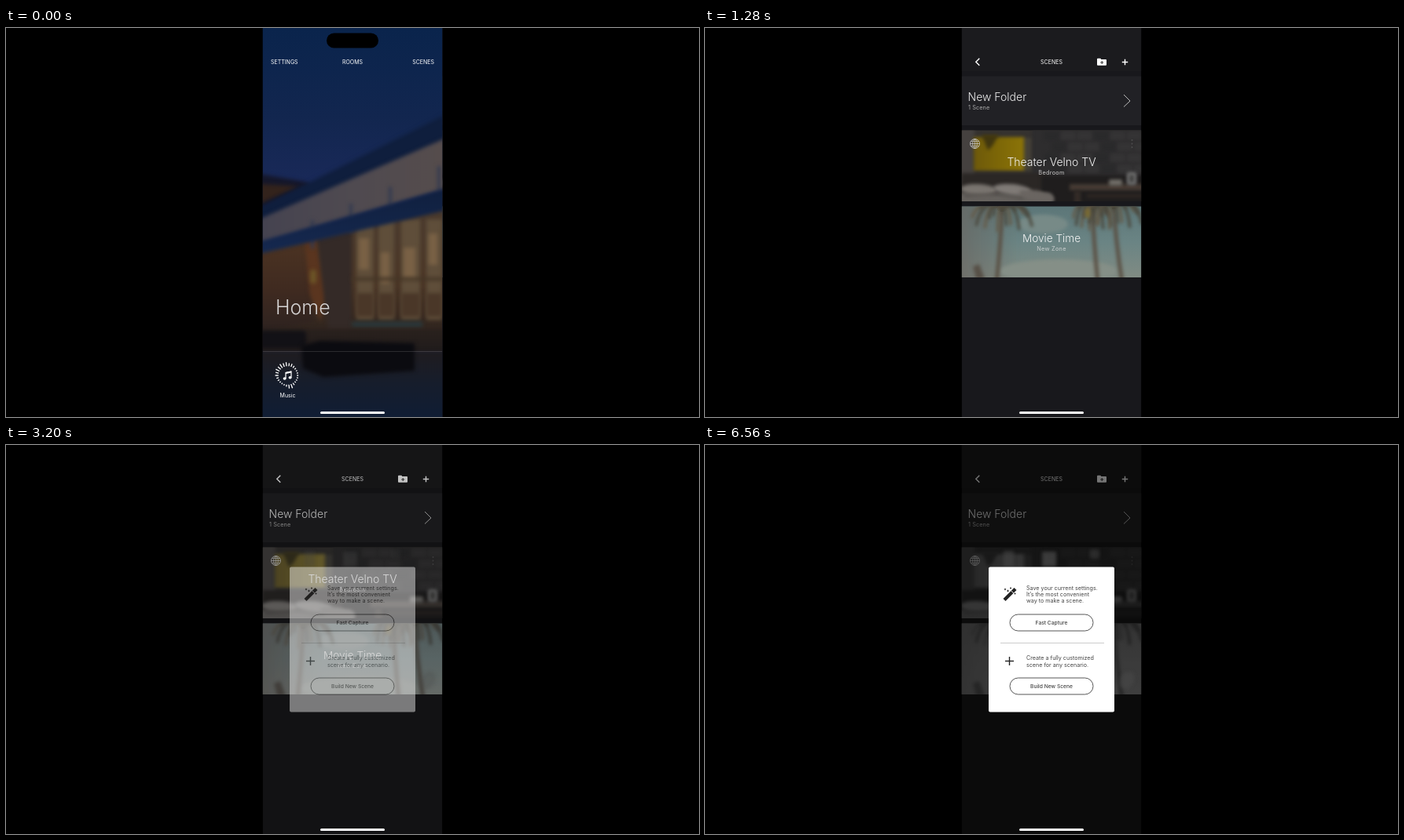
An HTML page with a canvas for the animation above (6.64 s loop, 882 by 496 pixels).

```html
<!DOCTYPE html>
<html lang="en">
<head>
<meta charset="utf-8">
<title>Scenes</title>
<style>
html, body { margin: 0; width: 100%; height: 100%; overflow: hidden; background: #000; }
canvas { display: block; }
</style>
</head>
<body>
<canvas id="stage" width="882" height="496"></canvas>
<script>
const LOOP = 6640, STEP = 80, X = 326.5, W = 229, H = 496;
const ctx = document.getElementById('stage').getContext('2d');

function layer(draw) {
  const c = document.createElement('canvas');
  c.width = 882;
  c.height = H;
  draw(c.getContext('2d'));
  return c;
}

function clipRect(g, x, y, w, h) {
  g.beginPath();
  g.rect(x, y, w, h);
  g.clip();
}

function rect(g, color, x, y, w, h, r = 0) {
  g.fillStyle = color;
  g.beginPath();
  g.roundRect(x, y, w, h, r);
  g.fill();
}

function poly(g, color, ...p) {
  g.fillStyle = color;
  g.beginPath();
  for (let i = 0; i < p.length; i += 2) g.lineTo(p[i], p[i + 1]);
  g.fill();
}

function line(g, color, width, ...p) {
  g.strokeStyle = color;
  g.lineWidth = width;
  g.beginPath();
  for (let i = 0; i < p.length; i += 2) g.lineTo(p[i], p[i + 1]);
  g.stroke();
}

function curve(g, color, width, x0, y0, cx, cy, x1, y1) {
  g.strokeStyle = color;
  g.lineWidth = width;
  g.beginPath();
  g.moveTo(x0, y0);
  g.quadraticCurveTo(cx, cy, x1, y1);
  g.stroke();
}

function oval(g, color, x, y, rx, ry = rx, turn = 0) {
  g.fillStyle = color;
  g.beginPath();
  g.ellipse(x, y, rx, ry, turn, 0, 7);
  g.fill();
}

function text(g, str, x, y, size, color = '#fff', align = 'left', weight = 400, gap = 0) {
  g.font = `${weight} ${size}px Inter, "Open Sans", sans-serif`;
  g.letterSpacing = gap + 'px';
  g.textAlign = align;
  g.fillStyle = color;
  g.fillText(str, x, y);
}

function plus(g, color, x, y, r, width) {
  line(g, color, width, x - r, y, x + r, y);
  line(g, color, width, x, y - r, x, y + r);
}

function gradient(g, x0, y0, x1, y1, ...colors) {
  const fill = g.createLinearGradient(x0, y0, x1, y1);
  colors.forEach((c, i) => fill.addColorStop(i / (colors.length - 1), c));
  return fill;
}

const down = (g, y0, y1, ...colors) => gradient(g, 0, y0, 0, y1, ...colors);

function house(g) {
  rect(g, down(g, 0, 230, '#0a244c', '#12264f', '#1c2a5c'), 310, -10, 270, 520);
  g.filter = 'blur(2.5px)';
  poly(g, '#15172a', 310, 184, 380, 196, 390, 201, 310, 238);
  poly(g, '#33231c', 310, 198, 372, 202, 310, 230);
  // Glass front
  poly(g, down(g, 250, 400, '#4a3a2d', '#4a3626', '#2a211d'), 310, 280, 570, 225, 570, 412, 310, 412);
  poly(g, down(g, 280, 390, '#4a3222', '#3f2a20', '#2c2220'), 310, 290, 384, 272, 392, 375, 310, 390);
  poly(g, '#5a351f', 380, 272, 396, 268, 407, 340, 400, 374, 387, 340);
  poly(g, '#342a27', 396, 268, 440, 258, 440, 385, 410, 385);
  rect(g, '#6b5426', 387, 308, 8, 18, 4);
  for (const [x, w] of [[446, 22], [474, 20], [503, 24], [535, 20]]) {
    rect(g, '#5f4e3a', x, 244, w, 128);
    rect(g, '#796145', x + 3, 262 + x % 5 * 6, w - 9, 40);
    rect(g, '#4a3728', x, 338, w, 30);
  }
  rect(g, '#443526', 440, 318, 116, 4);
  rect(g, '#2b3638', 440, 374, 90, 8);
  // Roof, fascia and lower beam
  poly(g, '#0f1e3d', 310, 235, 570, 105, 570, 140, 310, 255);
  poly(g, gradient(g, 326, 0, 556, 0, '#454350', '#4f4a50', '#554c4c'), 310, 249, 570, 136, 570, 202, 310, 279);
  for (const x of [388, 437, 487, 549])
    rect(g, '#323a50', x, 400 - x * .43 + 12, 4, 36);
  poly(g, down(g, 208, 285, '#10203f', '#15284f'), 310, 276, 570, 202, 570, 230, 310, 291);
  // Terrace
  rect(g, down(g, 384, 414, '#2a211d', '#1f1b1b'), 310, 384, 260, 30);
  rect(g, down(g, 412, 496, '#1f1c1f', '#161d2c', '#101d34'), 310, 412, 260, 100);
  rect(g, '#121116', 318, 386, 64, 22, 5);
  poly(g, '#0b0b10', 376, 405, 400, 399, 520, 402, 520, 437, 404, 445, 378, 434);
  g.filter = 'none';
}

const home = layer(g => {
  g.save();
  clipRect(g, X, 0, W, H);
  house(g);
  rect(g, '#000', 408, 6.5, 66, 19, 9.5);
  text(g, 'SETTINGS', 337, 45.7, 7);
  text(g, 'ROOMS', 441, 45.7, 7, '#fff', 'center');
  text(g, 'SCENES', 545, 45.7, 7, '#fff', 'right');
  text(g, 'Home', 343, 365, 25, '#d5d3d3', 'left', 300);
  rect(g, 'rgba(255,255,255,.13)', X, 412, W, 1);
  for (let i = 0; i < 26; i++) {
    const a = i * Math.PI / 13, c = Math.cos(a), s = Math.sin(a);
    const len = 1.8 + 3 * Math.max(0, Math.cos(a + 2.2)) * (1 + i % 2 * .3) + 4 * Math.max(0, Math.cos(a - 1.3)) ** 20;
    line(g, '#fff', 1.3, 358.5 + 11.8 * c, 443 + 11.8 * s, 358.5 + (11.8 + len) * c, 443 + (11.8 + len) * s);
  }
  line(g, '#fff', 1.2, 356, 447, 356, 439.5, 363, 438, 363, 445.5);
  line(g, '#fff', 1.8, 356, 440, 363, 438.5);
  oval(g, '#fff', 354.6, 447, 2, 1.7);
  oval(g, '#fff', 361.6, 445.7, 2, 1.7);
  text(g, 'Music', 358.5, 470.8, 7, '#fff', 'center');
  g.restore();
});

function bedroom(g) {
  g.save();
  clipRect(g, X, 130.5, W, 90.5);
  rect(g, '#35322f', 310, 120, 260, 110);
  g.filter = 'blur(2px)';
  rect(g, '#45413f', 320, 125, 23, 76);
  rect(g, '#2e2d2e', 416, 125, 150, 78);
  for (let i = 0; i < 24; i++)
    rect(g, i % 3 ? '#353435' : '#2a2a2b', 432 + i % 6 * 21 + (i / 6 & 1) * 9, 132 + (i / 6 | 0) * 14, 19, 11);
  rect(g, '#454138', 404, 140, 11, 42);
  rect(g, gradient(g, 342, 0, 406, 0, '#6d590b', '#7d6707', '#8c7408'), 342, 139, 64, 43);
  poly(g, '#40360f', 352, 136, 374, 136, 366, 150, 360, 156);
  rect(g, '#2b2725', 326, 185, 110, 20);
  rect(g, '#1f1d1d', 428, 188, 140, 40);
  rect(g, '#463b34', 464, 199, 100, 8);
  rect(g, '#342c27', 470, 208, 8, 16);
  rect(g, '#302824', 486, 212, 76, 4);
  rect(g, '#66625e', 318, 210, 125, 20, 6);
  oval(g, '#79746f', 348, 206, 23, 7, .05);
  oval(g, '#7f7a76', 391, 206, 24, 7, .1);
  oval(g, '#6a6561', 422, 214, 23, 6, .2);
  line(g, '#4a4643', 2, 330, 214, 372, 212, 405, 217);
  rect(g, '#6f6c66', 514, 193, 17, 8, 2);
  rect(g, '#767676', 537, 184, 12, 16, 2);
  rect(g, '#40403f', 540, 187, 6, 10);
  g.restore();
}

// Ragged crown on a slim, bent trunk
function palm(g, x, y, foot, spread) {
  g.lineCap = 'round';
  curve(g, '#5a5145', 5, x, y, x + (foot - x) * .2, y + 45, foot, 325);
  for (let i = 0; i < 15; i++) {
    const d = (i - 7) / 7 * spread;
    const drop = 20 + 13 * Math.sin(i * 2.4) - Math.abs(d) * .15;
    curve(g, i % 3 ? '#4a483d' : '#645a48', 3.5, x, y, x + d * .8, y - 9, x + d, y + drop);
  }
}

function beach(g) {
  g.save();
  clipRect(g, X, 227.5, W, 90.5);
  rect(g, down(g, 227, 318, '#5c7678', '#6a8484', '#808b83'), 310, 220, 260, 110);
  g.filter = 'blur(2px)';
  rect(g, gradient(g, 326, 0, 400, 0, 'rgba(105,103,99,.75)', 'rgba(105,103,99,0)'), 310, 220, 90, 110);
  oval(g, '#858f87', 450, 310, 75, 15);
  oval(g, '#778a87', 430, 250, 32, 12);
  palm(g, 378, 227, 371, 38);
  palm(g, 493, 225, 500, 24);
  palm(g, 520, 224, 531, 36);
  poly(g, '#575047', 345, 320, 341, 304, 349, 301, 356, 320);
  oval(g, '#7c6c30', 487, 236, 3, 7);
  g.restore();
}

const scenes = layer(g => {
  g.save();
  clipRect(g, X, 0, W, H);
  rect(g, '#18181c', X, 0, W, H);
  rect(g, '#1b1b1e', X, 0, W, 55);
  rect(g, '#212125', X, 61.5, W, 62.5);
  bedroom(g);
  beach(g);
  line(g, '#fff', 1.4, 349.3, 38.7, 344.8, 43.2, 349.3, 47.7);
  text(g, 'SCENES', 441, 45.7, 7, '#fff', 'center');
  rect(g, '#fff', 499, 38.8, 5, 3, 1);
  rect(g, '#fff', 499, 40, 12, 7.8, 1);
  plus(g, '#333', 505.2, 44, 2, 1);
  plus(g, '#fff', 534.5, 43.5, 3.7, 1.4);
  text(g, 'New Folder', 334.5, 93, 14, '#eee', 'left', 300);
  text(g, '1 Scene', 335, 104.3, 7.3, '#aaa', 'left', 400, .1);
  line(g, '#bbb', 1, 533, 85, 541, 93, 533, 100.5);
  g.strokeStyle = '#ccc';
  g.lineWidth = .8;
  for (const r of [6, 2.8]) {
    g.beginPath();
    g.ellipse(343.5, 147.5, r, 6, 0, 0, 7);
    g.stroke();
  }
  plus(g, '#ccc', 343.5, 147.5, 6, .7);
  for (const d of [-3, 3]) line(g, '#ccc', .6, 338.3, 147.5 + d, 348.7, 147.5 + d);
  for (const y of [143, 147.5, 152]) oval(g, 'rgba(255,255,255,.15)', 543.5, y, .9);
  text(g, 'Theater Velno TV', 441, 176, 14, '#f4f4f4', 'center', 300);
  text(g, 'Bedroom', 441, 187, 7.3, '#c4c4c4', 'center', 400, .3);
  text(g, 'Movie Time', 441, 273, 13.6, '#f4f4f4', 'center', 300);
  text(g, 'New Zone', 441, 284, 7.3, '#c9cece', 'center', 400, .3);
  g.restore();
});

function button(g, label, y) {
  g.strokeStyle = '#444';
  g.lineWidth = .9;
  g.beginPath();
  g.roundRect(388, y, 106, 21, 10.5);
  g.stroke();
  text(g, label, 441, y + 12.9, 6.7, '#444', 'center', 500);
}

const dialog = layer(g => {
  const note = (lines, y) => lines.forEach((s, i) => text(g, s, 409, y + i * 8.2, 7.15, '#444'));
  rect(g, '#fff', 361, 155.5, 160, 185, 2);
  line(g, '#222', 4.2, 381, 197.5, 395, 183.5);
  line(g, '#fff', 1, 389.5, 185.8, 392.8, 189);
  for (const [x, y, r] of [[382, 184, 1.2], [385.5, 186, 1.3], [389, 182.5, 1], [394.5, 189.5, 1]])
    plus(g, '#222', x, y, r, .9);
  note(['Save your current settings.', 'It\u2019s the most convenient', 'way to make a scene.'], 185);
  button(g, 'Fast Capture', 216);
  line(g, '#ccc', 1, 376, 252.5, 508, 252.5);
  plus(g, '#222', 387.5, 275.5, 5.5, 1.4);
  note(['Create a fully customized', 'scene for any scenario.'], 274.3);
  button(g, 'Build New Scene', 297);
});

// Pale patches that show up in the dimmed pictures
const glow = layer(g => {
  g.filter = 'blur(2px)';
  rect(g, '#555', 429, 136, 18, 19);
  rect(g, '#444', 380, 135, 13, 20);
  rect(g, '#3c3c3c', 490, 133, 12, 12);
  oval(g, '#484848', 537, 300, 9, 12, .5);
});

function render(t) {
  const s = t * .0246;
  const slide = (1 + s) * Math.exp(-s);
  const edge = W * slide;
  const q = Math.min(1, Math.max(0, (t - 3120) / 320));
  const shown = 1 - (1 - q) ** 2;

  rect(ctx, '#000', 0, 0, 882, H);
  ctx.save();
  clipRect(ctx, X, 0, W, H);
  if (shown) ctx.filter = `grayscale(${shown})`;
  ctx.drawImage(scenes, edge * .12, 0);
  ctx.filter = 'none';
  rect(ctx, `rgba(0,0,0,${Math.min(.5, slide * 2) + .54 * shown})`, X, 0, W, H);
  if (shown) {
    ctx.globalAlpha = shown * .6;
    ctx.drawImage(glow, 0, 0);
    ctx.globalAlpha = shown;
    ctx.drawImage(dialog, 0, 0);
    ctx.globalAlpha = 1;
  }
  if (edge > .3) ctx.drawImage(home, edge - W, 0);
  ctx.restore();
  rect(ctx, '#fff', 400, 489, 82, 3, 1.5);
}

const start = performance.now();
function tick() {
  const t = (performance.now() - start) % LOOP;
  render(Math.floor(t / STEP) * STEP);
  requestAnimationFrame(tick);
}
tick();
</script>
</body>
</html>
```
